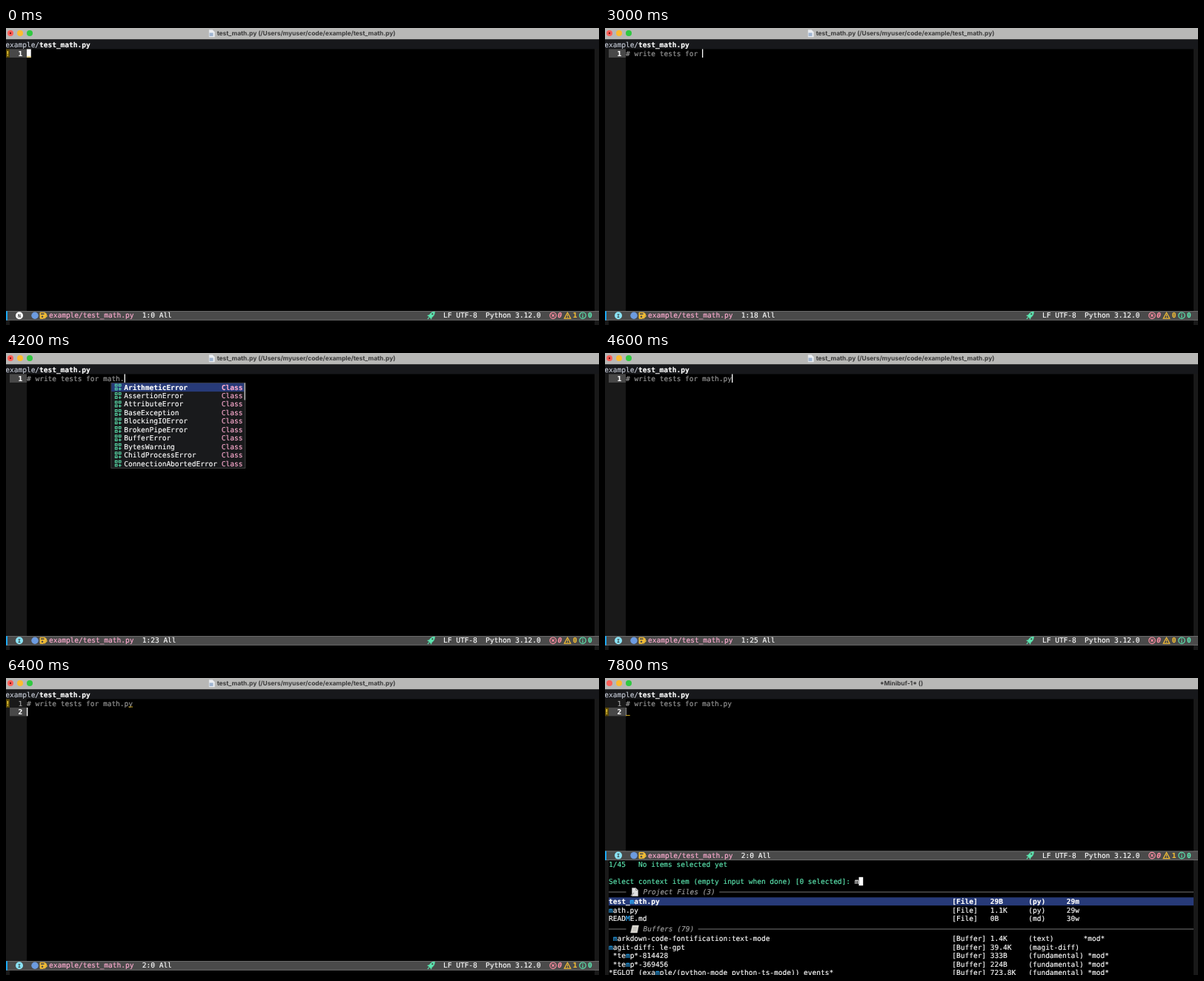
Write an HTML page that moves like this. It is 800 by 401 pixels and loops after 8 s.

```html
<!DOCTYPE html>
<html lang="en">
<head>
<meta charset="utf-8">
<title>Editor session</title>
<style>
  html, body { margin: 0; width: 100%; height: 100%; overflow: hidden; background: #000; }
  svg { display: block; width: 100%; height: 100%; }
  text {
    font: 9.5px "DejaVu Sans Mono", monospace;
    white-space: pre;
    text-rendering: geometricPrecision;
    fill: currentColor;
    stroke: currentColor;
    stroke-width: .15;
  }
  .bold { font-weight: 700; }
  .italic { font-style: italic; }
  .title { font: 700 8.35px Inter, sans-serif; color: #3a3a3a; stroke: none; text-anchor: middle; }
  .badge { font: 700 6.5px "DejaVu Sans Mono", monospace; color: #333; stroke: none; text-anchor: middle; }
  .match { fill: #2fafff; stroke: #2fafff; }
</style>
</head>
<body>
<svg id="stage" viewBox="0 0 800 401"></svg>
<script>
const CW = 5.72, LH = 11.45;
const LOOP = 8000, TICK = 200;
const LEFT = 28, TOP = 28.5;
const COMMENT = '# write tests for math.py ';
const PINK = '#feacd0', MINT = '#5ce6b0', GOLD = '#f2bd36', GREY = '#989898';
const FRINGE = '#191919', BAR = '#4a4a4a', SELECT = '#273a78', ROSE = '#ff8ea3';

// [time, characters typed]
const TYPING = [[0, 0], [600, 0], [1800, 7], [3000, 18], [4200, 23], [5000, 26], [5400, 25], [LOOP, 25]];

const CLASSES = ['ArithmeticError', 'AssertionError', 'AttributeError', 'BaseException',
  'BlockingIOError', 'BrokenPipeError', 'BufferError', 'BytesWarning',
  'ChildProcessError', 'ConnectionAbortedError'];

// [baseline, name, kind, size, mode, tail]
const ITEMS = [
  [305, 'test_math.py', '[File]', '29B', '(py)', '     29m'],
  [316.5, 'math.py', '[File]', '1.1K', '(py)', '     29w'],
  [328, 'README.md', '[File]', '0B', '(md)', '     30w'],
  [355.3, ' markdown-code-fontification:text-mode', '[Buffer]', '1.4K', '(text)', '       *mod*'],
  [366.7, 'magit-diff: le-gpt', '[Buffer]', '39.4K', '(magit-diff)', ''],
  [378.2, ' *temp*-814428', '[Buffer]', '333B', '(fundamental)', ' *mod*'],
  [389.6, ' *temp*-369456', '[Buffer]', '224B', '(fundamental)', ' *mod*'],
  [401, '*EGLOT (example/(python-mode python-ts-mode)) events*', '[Buffer]', '723.8K', '(fundamental)', ' *mod*']
];

const rect = (x, y, w, h, fill, extra = '') =>
  `<rect x="${x}" y="${y}" width="${w}" height="${h}" fill="${fill}" ${extra}/>`;
const circle = (x, y, r, fill, extra = '') =>
  `<circle cx="${x}" cy="${y}" r="${r}" fill="${fill}" ${extra}/>`;
const path = (d, stroke, width = 1, fill = 'none') =>
  `<path d="${d}" stroke="${stroke}" stroke-width="${width}" fill="${fill}"/>`;
const text = (x, y, content, color = '#fff', cls = '') =>
  `<text x="${x}" y="${y}" style="color:${color}" class="${cls}">${content}</text>`;
const fringes = (left, y, h) => rect(0, y, left, h, FRINGE) + rect(794, y, 6, h, FRINGE);

function typedAt(t) {
  const i = TYPING.findIndex(([time]) => time > t);
  const [t0, n0] = TYPING[i - 1], [t1, n1] = TYPING[i];
  return Math.round(n0 + (n1 - n0) * (t - t0) / (t1 - t0));
}

function stateAt(t) {
  const line = t < 6000 ? 1 : 2;
  const typed = typedAt(t);
  let warning = null;
  if (t < 2200) warning = { line: 1, col: 0, length: typed + 1 };
  else if (t >= 6800) warning = { line: 2, col: 0, length: 1 };
  else if (t >= 6400) warning = { line: 1, col: 24, length: 1 };
  return {
    line, typed, warning,
    col: line === 1 ? typed : 0,
    insert: t >= 400,
    popup: t >= 4200 && t < 4400,
    panel: t >= 7400,
    input: t >= 7800 ? 'm' : ''
  };
}

function titleBar(panel) {
  let out = rect(0, 0, 800, 15.5, '#b8b8b6') + rect(0, 15.5, 800, 13, '#17181b');
  ['#ff5f57', '#febc2e', '#30c840'].forEach((fill, i) => out += circle(6 + 13 * i, 7, 4, fill));
  if (panel) return out + `<text class="title" x="400" y="10">*Minibuf-1* ()</text>`;
  return out + circle(6, 7, 1.2, '#7a1410')
    + path('M274 2.5h4.5l3 3v6.5h-7.5z', '#d9dde3', .5, '#eceef1')
    + rect(274.5, 6.5, 5, 4.5, '#9fb4cf')
    + `<text class="title" x="405" y="10">test_math.py (/Users/myuser/code/example/test_math.py)</text>`;
}

function editor({ line, typed, col, insert, warning, panel }) {
  const bottom = panel ? 234 : 382;
  const rowTop = TOP + (line - 1) * LH, caretX = LEFT + col * CW;
  let out = fringes(28, 28, bottom - 28)
    + text(-.7, 25.8, 'example/', '#c6cbd6') + text(45, 25.8, 'test_math.py', '#fff', 'bold')
    + rect(5, rowTop, 23, LH, '#484848');
  for (let n = 1; n <= line; n++) {
    const current = n === line;
    out += text(16.4, 37.6 + (n - 1) * LH, n, current ? '#fff' : '#a8a8a8', current ? 'bold' : '');
  }
  out += text(LEFT, 37.6, COMMENT.slice(0, typed), GREY);
  out += panel
    ? rect(caretX, rowTop, .8, LH, '#aaa')
    : rect(caretX, rowTop, insert ? 1.3 : CW, LH, '#fff');
  if (warning) {
    const y = TOP + (warning.line - 1) * LH;
    out += rect(0, y, 5, LH, '#5b4a08') + text(-.4, y + 9.1, '!', '#ffd83a', 'bold')
      + rect(LEFT + warning.col * CW, y + 10, warning.length * CW, 1, '#c9a31c');
  }
  return out;
}

function modeLine({ line, col, insert, warning, panel }) {
  const icons = circle(18, 6, 5, insert ? '#8be3f5' : '#fff')
    + `<text class="badge" x="18" y="8.4">${insert ? 'I' : 'N'}</text>`
    + circle(39, 6, 4.7, '#6c9be0')
    + path('M46 2h6.5l2 2v1.5l-4 4.5h-4.5z', GOLD, 1, GOLD)
    + rect(47, 3, 4.5, 1.7, BAR) + circle(49, 7.6, 1.3, BAR)
    + path('M51.5 10l4-4', GOLD, 1.6);
  const rocket = path('M578.5 .8c-4 0-6 2-7.5 4.5l-2.5.7 2 1.3 1.8 1.8 1.3 2 .8-2.5c2.5-1.6 4-3.8 4.1-7.8z', MINT, .5, MINT)
    + circle(575.3, 4, 1.1, BAR) + path('M571 8.5l-2.2 2.2', MINT, 1.2);
  const checks = circle(738, 6, 4.2, 'none', `stroke="${ROSE}" stroke-width="1.2"`)
    + path('M736.3 4.3l3.4 3.4m0-3.4l-3.4 3.4', ROSE, 1.2)
    + text(744.3, 9.2, '0', ROSE, 'bold italic')
    + path('M757.5 2l4.3 8h-8.6z', GOLD, 1.2) + path('M757.5 4.8v2.5m0 .7v1', GOLD, 1)
    + text(764.7, 9.2, warning ? '1' : '0', GOLD, 'bold')
    + circle(778, 6, 4.2, 'none', `stroke="${MINT}" stroke-width="1.2"`)
    + path('M778 3.3v1.2m0 .8v3.4', MINT, 1.2)
    + text(785, 9.2, '0', MINT, 'bold');
  return `<g transform="translate(0 ${panel ? 233.6 : 382.2})">`
    + rect(0, 0, 800, 12.4, BAR) + path('M0 .3H800M0 12.1H800', '#8c8c8c', .6)
    + rect(0, 0, 2, 12.4, '#1ba6f2') + icons
    + text(58, 9.2, 'example/test_math.py', PINK) + text(183.8, 9.2, `${line}:${col} All`)
    + rocket + text(590, 9.2, 'LF UTF-8') + text(647, 9.2, 'Python 3.12.0') + checks + '</g>';
}

function completions() {
  let out = rect(141.8, 40.3, 181, 115.2, '#191a1c', 'stroke="#4a4a4a" stroke-width=".8"')
    + rect(142.3, 40.7, 179, LH, SELECT) + rect(321.3, 40.5, 1.7, 23, '#a0a0a0');
  CLASSES.forEach((name, i) => {
    const y = 49.5 + i * LH, cls = i ? '' : 'bold';
    for (const [dx, dy] of [[0, 0], [5, 0], [0, 5]])
      out += rect(147.3 + dx, y - 7.3 + dy, 2.7, 2.7, 'none', `stroke="${MINT}"`);
    out += path(`M153.7 ${y - 2.8}v4m-2-2h4`, MINT)
      + text(159.2, y, name, '#fff', cls) + text(290.8, y, 'Class', PINK, cls);
  });
  return out;
}

function groupHeader(y, label, icon) {
  const end = 51.5 + label.length * CW;
  return path(`M5 ${y}H28.5M${end + 5.5} ${y}H794`, '#777')
    + `<g transform="translate(40 ${y})">${icon}</g>`
    + text(51.5, y + 3.3, label, '#a0a0a0', 'italic');
}

const FILE_ICON = path('M-3.5-5.5h5l3 3v8h-8z', '#bbb', .5, '#e2e2e2')
  + path('M1.5-5.5v3h3', '#888', .8) + path('M-5 5l4-4', '#999', 1.2);
const NOTE_ICON = path('M-3-5h8.5l-2 10h-9z', '#bbb', .5, '#dedbd2')
  + path('M-2-2h5m-5.5 2h5m-5.5 2h5', '#999', .6);

function panelView(input) {
  const prompt = 'Select context item (empty input when done) [0 selected]: ';
  const inputX = 5 + prompt.length * CW;
  let out = rect(0, 246, 800, 155, '#000') + fringes(5, 246, 155)
    + text(5, 255, '1/45   No items selected yet', MINT)
    + text(5, 278, prompt, MINT) + text(inputX, 278, input)
    + rect(inputX + input.length * CW, 268.8, CW, LH, '#fff')
    + groupHeader(289, 'Project Files (3)', FILE_ICON)
    + rect(5, 296.2, 789, 11, SELECT)
    + groupHeader(339, 'Buffers (79)', NOTE_ICON);
  ITEMS.forEach(([y, name, kind, size, mode, tail], i) => {
    const label = input ? name.replace(/m/i, '<tspan class="match">$&</tspan>') : name;
    const details = kind.padEnd(9) + size.padEnd(9) + mode + tail;
    const cls = i ? '' : 'bold';
    out += text(5, y, label, '#fff', cls) + text(5 + 81 * CW, y, details, '#fff', cls);
  });
  return out;
}

function render(state) {
  return rect(0, 0, 800, 401, '#000') + fringes(5, 394, 7)
    + titleBar(state.panel) + editor(state)
    + (state.panel ? panelView(state.input) : '')
    + modeLine(state) + (state.popup ? completions() : '');
}

const stage = document.getElementById('stage');
const start = performance.now();
let shown = -1;

function frame() {
  const elapsed = (performance.now() - start) % LOOP;
  const tick = Math.floor(elapsed / TICK) * TICK;
  if (tick !== shown) {
    shown = tick;
    stage.innerHTML = render(stateAt(tick));
  }
  requestAnimationFrame(frame);
}
frame();
</script>
</body>
</html>
```
